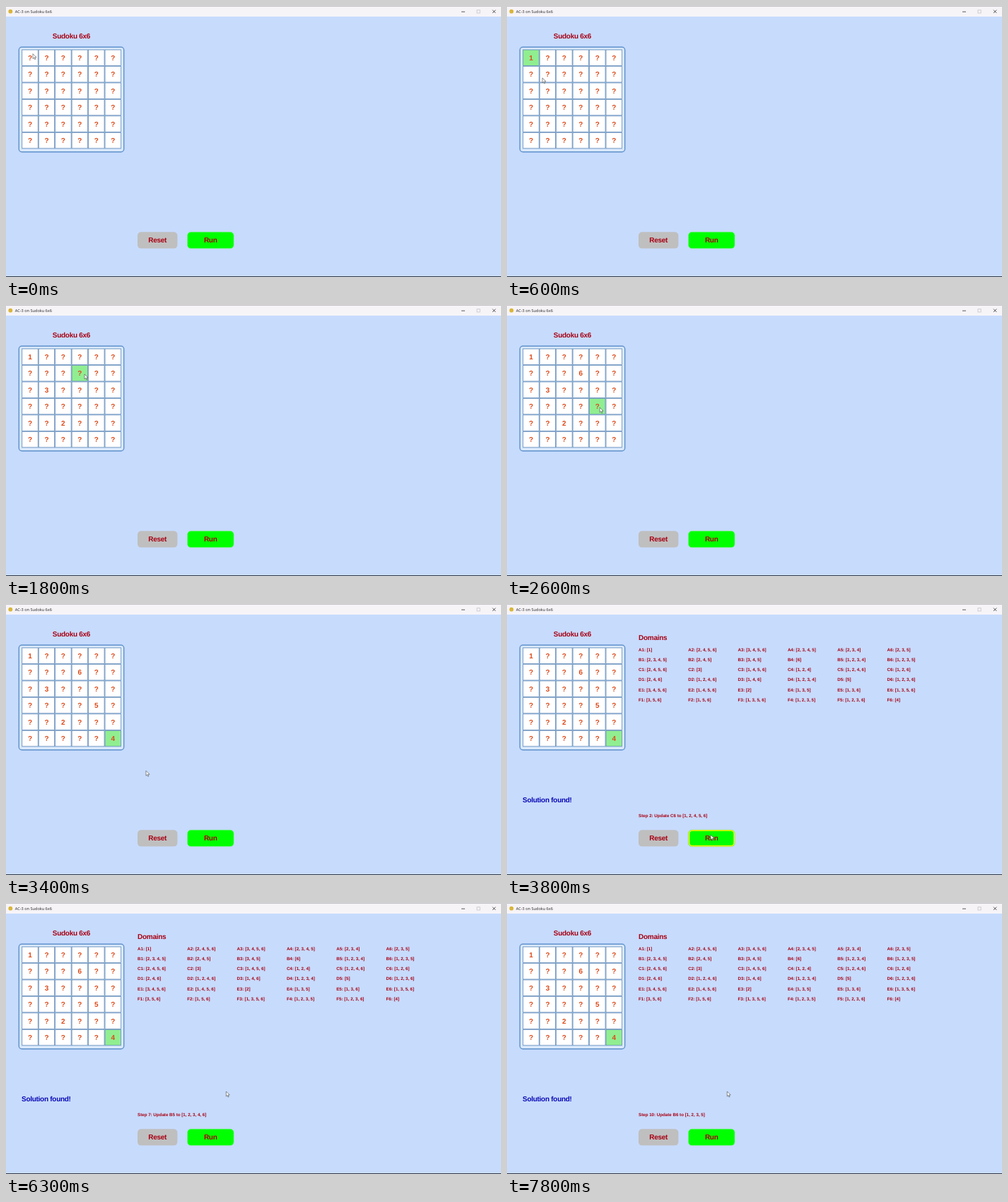
Write an HTML page that moves like this. It is 700x384 px and loops after 8000 ms.

```html
<!DOCTYPE html>
<html lang="en">
<head>
<meta charset="utf-8">
<title>AC-3 on Sudoku 6x6</title>
<style>
  html, body { margin: 0; width: 100%; height: 100%; overflow: hidden; background: #c7dbfd; }
  svg { display: block; width: 700px; height: 384px; }
  text { font: bold 10px "Liberation Sans", Arial, sans-serif; letter-spacing: -.28px; fill: #a80012; text-rendering: geometricPrecision; white-space: pre; }
  .bar { font: 5.6px "Open Sans", sans-serif; letter-spacing: 0; fill: #222; }
  .mid { text-anchor: middle; }
  .small { font-size: 6.2px; letter-spacing: 0; }
  .cell rect { fill: #fff; stroke: #648cb8; stroke-width: .7; }
  .cell.on rect { fill: #90ee90; }
  .cell text { fill: #dc4a1a; letter-spacing: 0; }
  .found { fill: #0a0ab4; }
</style>
</head>
<body>
<svg id="stage" viewBox="0 0 700 384">
  <rect width="700" height="384" fill="#c7dbfd"/>
  <rect width="700" height="15" fill="#f7f4f8"/>
  <rect width="700" height="1" fill="#c4c2c6"/>
  <rect y="383" width="700" height="1" fill="#343a46"/>
  <circle cx="6.3" cy="7.7" r="2.9" fill="#d9b53a"/>
  <text class="bar" x="12.8" y="10">AC-3 on Sudoku 6x6</text>
  <g fill="none" stroke="#333" stroke-width=".8">
    <path d="M644 8.2h5M688 5.6l4.4 4.4M692.4 5.6l-4.4 4.4"/>
    <rect x="666" y="5.8" width="4.2" height="4.2" stroke="#c4c2c6"/>
  </g>

  <text x="65.8" y="46.3">Sudoku 6x6</text>
  <rect x="18.3" y="58.3" width="148.4" height="148.4" rx="4" fill="#d9e8fc" stroke="#5f92ca" stroke-width="1.4"/>
  <rect x="22" y="61.4" width="141" height="141" fill="#a9c8ea"/>
  <g id="grid"></g>

  <g id="result">
    <text x="186" y="51.2">Domains</text>
    <g id="domains"></g>
    <text class="found" x="22" y="281.2">Solution found!</text>
    <text class="small" id="step" x="186" y="302.2"></text>
  </g>

  <rect x="186" y="320.2" width="56.4" height="23.4" rx="5" fill="#bfbfbf"/>
  <text class="mid" x="214.2" y="335.2">Reset</text>
  <rect x="256.5" y="320.2" width="65.6" height="23.4" rx="5" fill="#00ff00" stroke="#7df08c" stroke-width=".6"/>
  <rect id="hover" x="257.6" y="321" width="63.6" height="21.8" rx="4.5" fill="none" stroke="#f4f400" stroke-width="1.6"/>
  <text class="mid" x="289.2" y="335.2">Run</text>

  <path id="cursor" d="M0 0V7L1.6 5.5 2.7 8 3.8 7.5 2.7 5H5Z" fill="#fff" stroke="#444" stroke-width=".6"/>
</svg>
<script>
const LOOP = 8000, TICK = 100;
const $ = id => document.getElementById(id);

function add(parent, tag, attrs, text = '') {
  const el = document.createElementNS('http://www.w3.org/2000/svg', tag);
  for (const k in attrs) el.setAttribute(k, attrs[k]);
  el.textContent = text;
  return parent.appendChild(el);
}

const list = digits => '[' + [...digits].join(', ') + ']';

const domains = [
  '1 2456 3456 2345 234 235',
  '2345 245 345 6 1234 1235',
  '2456 3 1456 124 1246 126',
  '246 1246 146 1234 5 1236',
  '3456 1456 2 135 136 1356',
  '356 156 1356 1235 1236 4'
];

// cell: selected at, typed at, digit
const entries = {
  A1: [100, 300, 1], C2: [700, 900, 3], E3: [1300, 1500, 2],
  B4: [1800, 2200, 6], D5: [2500, 2900, 5], F6: [3200, 3400, 4]
};

const solvedAt = 3800;
const steps = [
  'C6 12456', 'C4 12456', 'A3 13456', 'A5 12346', 'A4 12345',
  'B5 12346', 'C5 1246', 'B6 12356', 'B6 1235'
];

// time, x, y of the pointer tip
const path = [
  [0, 38, 67.7], [400, 38, 67.7], [700, 56, 119], [900, 56, 119], [1100, 77, 161.3],
  [1200, 79, 164], [1500, 79, 164], [1800, 111, 98], [2200, 111, 98],
  [2500, 131.2, 145.2], [2900, 131.2, 145.2], [3200, 153, 191], [3300, 153, 191],
  [3600, 288, 327], [3900, 288, 327], [4000, 304, 296], [4100, 311.3, 267]
];

const cells = {};
domains.forEach((row, r) => row.split(' ').forEach((digits, c) => {
  const name = 'ABCDEF'[r] + (c + 1);
  const g = add($('grid'), 'g', { class: 'cell' });
  const x = 34 + c * 23.45, y = 73.3 + r * 23.45;
  add(g, 'rect', { x: x - 11.2, y: y - 11.2, width: 22.4, height: 22.4 });
  const label = add(g, 'text', { x, y: y + 3.4, class: 'mid' });
  cells[name] = { g, label };
  add($('domains'), 'text', { x: 186 + c * 70.3, y: 67.2 + r * 14.08, class: 'small' },
    `${name}: ${list(digits)}`);
}));

function pointer(t) {
  const i = path.findIndex(p => p[0] > t);
  if (i < 0) return path[path.length - 1].slice(1);
  const [t0, x0, y0] = path[i - 1], [t1, x1, y1] = path[i];
  const k = (t - t0) / (t1 - t0);
  return [x0 + (x1 - x0) * k, y0 + (y1 - y0) * k];
}

function draw(t) {
  const selected = Object.keys(entries).filter(n => entries[n][0] <= t).pop();
  for (const name in cells) {
    const { g, label } = cells[name], e = entries[name];
    g.classList.toggle('on', name === selected);
    label.textContent = e && t >= e[1] ? e[2] : '?';
  }

  const solved = t >= solvedAt;
  $('result').style.display = solved ? '' : 'none';
  if (solved) {
    const n = Math.floor((t - solvedAt) / 500);
    const [name, digits] = steps[n].split(' ');
    $('step').textContent = `Step ${n + 2}: Update ${name} to ${list(digits)}`;
  }

  const [x, y] = pointer(t);
  $('cursor').setAttribute('transform', `translate(${x} ${y})`);
  const over = x > 256 && x < 322 && y > 320 && y < 344;
  $('hover').style.display = over ? '' : 'none';
}

let last = -1;
function frame() {
  const t = Math.floor(performance.now() % LOOP / TICK) * TICK;
  if (t !== last) draw(last = t);
  requestAnimationFrame(frame);
}
frame();
</script>
</body>
</html>
```
